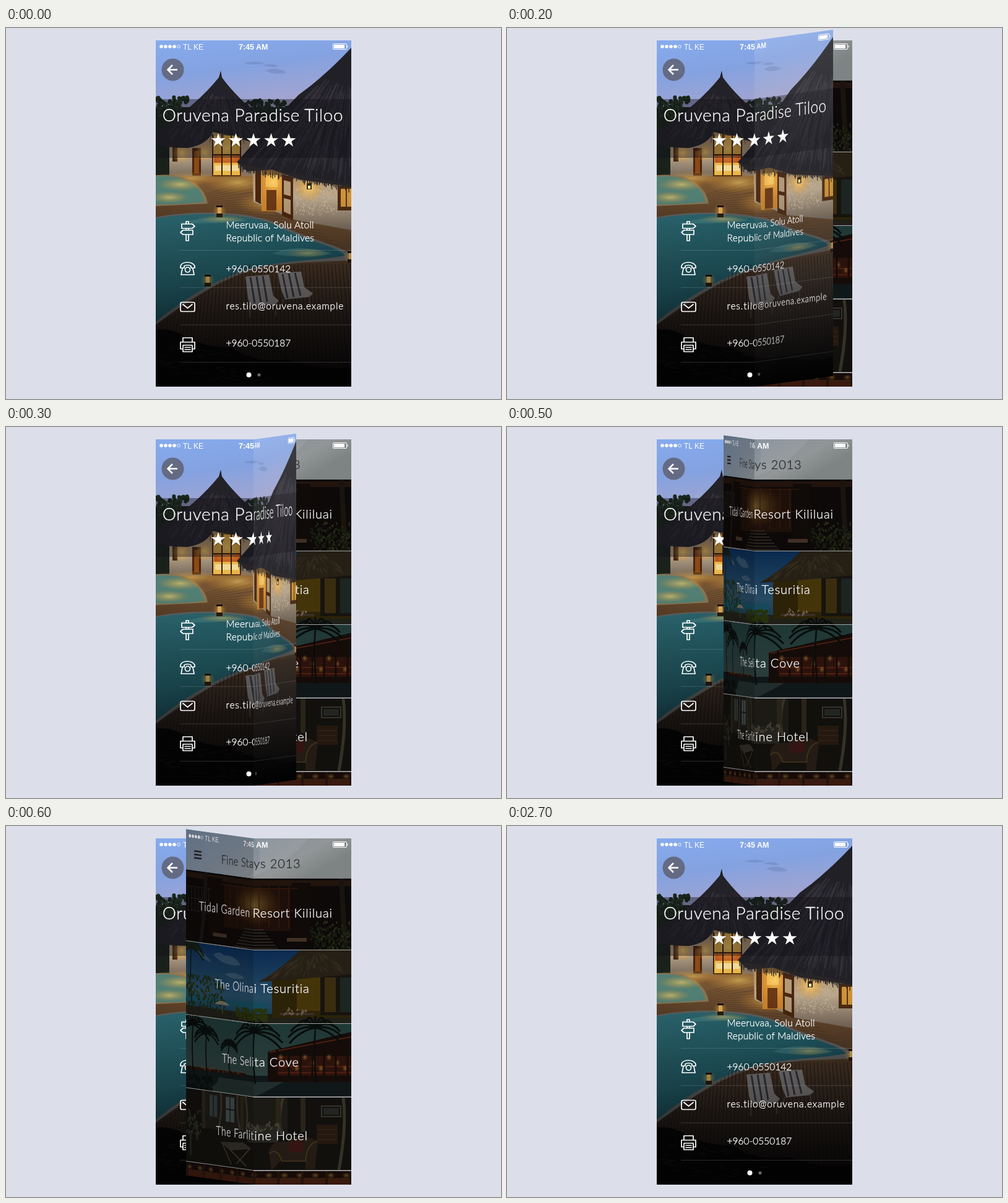
Write an HTML page that moves like this. It is 800 by 600 pixels and loops after 2.8 s.

```html
<!DOCTYPE html>
<html lang="en">
<head>
<meta charset="utf-8">
<title>Page flip</title>
<style>
html, body { margin: 0; width: 100%; height: 100%; overflow: hidden; background: #dcdfea; }
svg { display: block; width: 800px; height: 600px; }
text { font-family: Lato, "Open Sans", sans-serif; fill: #fff; }
.status { font: 12px "Liberation Sans", Arial, sans-serif; }
.bold { font-weight: bold; font-size: 12.5px; }
.title, .info, .item { font-weight: 300; stroke: #fff; stroke-width: .35px; }
.title { font-size: 28px; letter-spacing: .6px; text-anchor: middle; }
.info { font-size: 15.5px; }
.item { font-size: 20px; letter-spacing: .85px; text-anchor: middle; }
.heading { fill: #29292e; stroke: #29292e; }
.icon { fill: none; stroke: #fff; stroke-width: 1.7; stroke-linejoin: round; stroke-linecap: round; }
</style>
</head>
<body>
<svg viewBox="0 0 800 600">
  <defs>
    <clipPath id="left"><path d="M242 20H400V580H242Z"/></clipPath>
    <clipPath id="right"><path d="M400 20H558V580H400Z"/></clipPath>
    <linearGradient id="sky" x2=".35" y2="1"><stop stop-color="#86abee"/><stop offset=".45" stop-color="#84a2e0"/><stop offset="1" stop-color="#a9a5cc"/></linearGradient>
    <linearGradient id="deck" x2="0" y2="1"><stop stop-color="#7b5834"/><stop offset=".3" stop-color="#5a402a"/><stop offset=".6" stop-color="#352922"/><stop offset="1" stop-color="#100e0f"/></linearGradient>
    <linearGradient id="pool" x2=".7" y2="1"><stop stop-color="#2d6872"/><stop offset=".5" stop-color="#245f69"/><stop offset="1" stop-color="#113b4a"/></linearGradient>
    <linearGradient id="wall" x2="0" y2="1"><stop stop-color="#a98556"/><stop offset=".5" stop-color="#b9a78c"/><stop offset="1" stop-color="#77685a"/></linearGradient>
    <linearGradient id="dim" x2="0" y2="1"><stop stop-opacity="0"/><stop offset=".55" stop-opacity=".35"/><stop offset="1" stop-opacity=".75"/></linearGradient>
    <linearGradient id="sheen" x2="0" y2="1"><stop stop-color="#fff" stop-opacity=".13"/><stop offset=".45" stop-color="#999" stop-opacity=".05"/><stop offset="1" stop-opacity=".3"/></linearGradient>
    <radialGradient id="glow"><stop stop-color="#ffd56a" stop-opacity=".9"/><stop offset="1" stop-color="#e08a20" stop-opacity="0"/></radialGradient>
    <linearGradient id="head" y2=".35"><stop stop-color="#71839b"/><stop offset=".45" stop-color="#808c9a"/><stop offset=".8" stop-color="#929697"/><stop offset="1" stop-color="#7e8384"/></linearGradient>
    <linearGradient id="sea" x2="0" y2="1"><stop stop-color="#0b2a50"/><stop offset=".65" stop-color="#264a62"/><stop offset="1" stop-color="#123747"/></linearGradient>
    <linearGradient id="dusk" x2="0" y2="1"><stop stop-color="#1e3836"/><stop offset=".7" stop-color="#2b3d3a"/><stop offset="1" stop-color="#101b1d"/></linearGradient>
    <g id="detail"></g>
    <g id="list"></g>
  </defs>
  <use href="#detail" clip-path="url(#left)"/>
  <use href="#list" clip-path="url(#right)"/>
  <g id="flap">
    <use id="face"/>
    <rect id="shade" y="20" width="158" height="560"/>
  </g>
</svg>
<script>
const $ = id => document.getElementById(id);
let seed = 11;
const rnd = () => (seed = seed * 16807 % 2147483647) / 2147483647;
const repeat = (n, fn) => Array.from({ length: n }, (_, i) => fn(i)).join('');
const fill = (color, d, more = '') => `<path d="${d}" fill="${color}" ${more}/>`;
const line = (color, width, d, more = '') =>
  `<path d="${d}" fill="none" stroke="${color}" stroke-width="${width}" ${more}/>`;
const box = (color, x, y, w, h) => fill(color, `M${x} ${y}h${w}v${h}h${-w}z`);
const dot = (color, x, y, r) => `<circle cx="${x}" cy="${y}" r="${r}" fill="${color}"/>`;
const glow = (x, y, rx, ry = rx, opacity = 1) =>
  `<ellipse cx="${x}" cy="${y}" rx="${rx}" ry="${ry}" fill="url(#glow)" opacity="${opacity}"/>`;
const text = (cls, x, y, str, more = '') => `<text class="${cls}" x="${x}" y="${y}" ${more}>${str}</text>`;

const leaves = (color, n, x, y, w, h, size = 4) => line(color, size,
  repeat(n, () => `M${x + rnd() * w} ${y + rnd() * h}l${rnd() * 4 - 2} 2`), 'stroke-linecap="round"');

// Strands running from a ridge point down to an eave
const thatch = (color, n, ax, ay, x0, y0, x1, y1) => line(color, .8, repeat(n, () => {
  const f = rnd(), from = .25 + rnd() * .6, to = from + .15;
  const ex = x0 + (x1 - x0) * f, ey = y0 + (y1 - y0) * f;
  return `M${ax + (ex - ax) * from} ${ay + (ey - ay) * from}L${ax + (ex - ax) * to} ${ay + (ey - ay) * to}`;
}));

const palm = (color, x, y, r, base) => line(color, 2.5, `M${x} ${y}Q${x - 4} ${(y + base) / 2} ${x + 2} ${base}`) +
  line(color, 3, repeat(11, i => {
    const a = Math.PI * (.9 + i * .12), dx = Math.cos(a) * r, dy = Math.sin(a) * r * .6;
    return `M${x} ${y}q${dx * .6} ${dy - 3} ${dx} ${dy + r * .4}`;
  }));

const lantern = (x, y) => glow(x, y, 12, 12, .6) + box('#1b120c', x - 5, y - 9, 10, 3) +
  box('#e0ad55', x - 3, y - 6, 6, 10) + box('#2a1a0d', x - 5, y + 4, 10, 6);

const star = cx => fill('#fff', 'M' + Array.from({ length: 10 }, (_, i) => {
  const r = i % 2 ? 4.6 : 12, a = i * Math.PI / 5;
  return [cx + r * Math.sin(a), 182 - r * Math.cos(a)].map(v => v.toFixed(1));
}).join('L') + 'Z');

const status = repeat(4, i => dot('#fff', 251 + i * 7, 30, 2.8)) +
  '<circle cx="279" cy="30" r="2.4" fill="none" stroke="#fff" stroke-width=".8"/>' +
  text('status', 286, 34.5, 'TL KE') + text('status bold', 376, 34.5, '7:45 AM') +
  line('#fff', 1, 'M530 25.5h19q1.5 0 1.5 1.5v6q0 1.5-1.5 1.5h-19q-1.5 0-1.5-1.5v-6q0-1.5 1.5-1.5zM552 28.5v3') +
  box('#fff', 530, 27, 17, 6);

const scene =
  box('url(#sky)', 242, 20, 316, 120) +
  fill('#6f84b8', 'M384 57q18-5 34 0q-18 4-34 0zM419 69q17-8 35 3q-20 5-35-3zM415 60q15-4 26 2q-14 3-26-2z', 'opacity=".5"') +
  box('#1a211b', 242, 128, 316, 120) +
  leaves('#18271a', 140, 242, 112, 58, 90, 6) + leaves('#263a22', 45, 244, 115, 44, 30, 3) +
  leaves('#1b2a20', 60, 385, 116, 80, 18, 5) +
  palm('#172419', 405, 121, 10, 135) +
  // Left hut
  fill('url(#wall)', 'M264 185L335 168L400 185V240H264Z') +
  box('#3d2412', 269, 193, 8, 23) + box('#4a230d', 301, 194, 14, 45) + box('#8a4a16', 304, 199, 8, 36) +
  glow(284, 202, 17) + glow(321, 201, 16) +
  box('#e9b94b', 334, 174, 45, 66) + box('#b9531f', 336, 206, 42, 12) + box('#f0d898', 338, 222, 38, 9) +
  glow(357, 195, 28) +
  line('#3b1d0c', 2, 'M334 172V240M349 172V240M364 172V240M379 172V240M334 205H379M334 239H379') +
  fill('#232228', 'M347 69L349 80Q380 123 455 178L440 200Q388 177 336 166Q325 189 294 194Q264 194 242 188V168Q305 128 344 80Z') +
  thatch('#3c393f', 170, 347, 78, 242, 188, 440, 195) +
  // Terrace
  box('url(#deck)', 242, 240, 316, 340) +
  line('#3a2818', .7, repeat(26, i => `M242 ${285 + i * 1.2}Q330 ${270 + i * 2} ${410 + i * 7} ${243 + i * 6}`), 'opacity=".55"') +
  glow(300, 243, 62, 11, .55) + glow(375, 250, 55, 18, .6) + glow(425, 283, 55, 20, .65) +
  // Right hut
  fill('url(#wall)', 'M398 220H558V327L465 310L400 281Z') +
  leaves('#c9baa2', 150, 468, 254, 66, 48, 1) +
  box('#cd862d', 413, 230, 36, 66) + box('#efbd5b', 420, 237, 19, 20) + glow(433, 250, 30, 38, .8) +
  box('#6b3916', 421, 262, 16, 33) +
  fill('#4a260f', 'M403 230h9v55l-9-5zM446 237l18 4v70l-18-8z') +
  fill('#b39a77', 'M449 246l11 3v23l-11-3zM449 275l11 3v24l-11-5z') +
  glow(490, 258, 24) + box('#34251a', 486, 251, 8, 10) + box('#fff0b4', 488, 255, 4, 5) +
  box('#4c2a10', 536, 255, 22, 40) + box('#cf9339', 541, 260, 17, 29) + line('#55310f', 2, 'M550 258V291') +
  fill('#212026', 'M558 32Q515 78 473 108Q424 158 373 217L390 232L430 229L475 245L558 257Z') +
  thatch('#3b3840', 260, 558, 35, 378, 222, 558, 255) +
  line('#2c2728', 1.3, repeat(90, i => `M${376 + i * 2} ${219 + i * .37}l${rnd() * 2 - 1} ${7 + rnd() * 8}`)) +
  // Pools
  fill('#857555', 'M242 238Q283 235 306 251Q324 266 326 284L242 288Z') +
  fill('#527f74', 'M242 240Q282 238 302 253Q318 265 320 281Q280 286 242 285Z') +
  glow(282, 253, 38, 11, .65) + glow(264, 274, 32, 10, .65) +
  fill('#5f615f', 'M242 306C300 294 400 295 445 319C500 346 547 353 558 368V376C505 379 440 377 382 397C330 416 278 453 242 480Z') +
  fill('url(#pool)', 'M242 308C300 297 400 298 442 322C492 347 538 354 548 368C505 377 435 375 378 394C325 413 276 448 242 475Z') +
  fill('#5a9a98', 'M278 316Q330 301 390 311Q346 317 278 316ZM430 365Q470 347 527 365Q480 374 430 365Z', 'opacity=".35"') +
  glow(488, 364, 36, 8, .5) + glow(350, 309, 42, 7, .5) +
  line('#0b0b0d', 1, repeat(54, i => `M${250 + i * 6} ${Math.max(382, 478 - i * 4.3)}L${228 + i * 6.8} 580`), 'opacity=".6"') +
  // Loungers
  fill('#807c7b', 'M387 402L425 399L432 433L441 441L436 447L395 449L391 437Z M439 396L477 394L482 419L496 429L491 435L451 439L445 424Z') +
  line('#343742', 3, 'M395 403l7 42M405 402l7 42M415 401l7 42M447 398l8 39M457 397l8 38M467 396l9 37') +
  line('#4c4341', 2, 'M394 448v21M436 446v19M449 438l-3 13M491 433v13') +
  lantern(326, 408) + lantern(345, 296) + lantern(557, 370) +
  fill('#070709', 'M242 488Q270 484 294 502Q330 518 363 516Q405 543 455 536Q510 555 558 548V580H242Z') +
  line('#1c1c20', 1, repeat(55, () => `M${242 + rnd() * 180} ${510 + rnd() * 60}l12 ${rnd() * 7 - 3}`)) +
  box('url(#dim)', 242, 270, 316, 310);

$('detail').innerHTML = scene +
  box('rgba(18,16,22,.42)', 242, 115, 316, 95) + status +
  dot('rgba(91,91,106,.78)', 269.5, 67.5, 18) +
  line('#fff', 2.5, 'M277 67.5H262M269 60L261.5 67.5L269 75') +
  text('title', 399, 151, 'Oruvena Paradise Tiloo') +
  repeat(5, i => star(343 + i * 28.5)) +
  text('info', 355.5, 324, 'Meeruvaa, Solu Atoll', 'letter-spacing=".25"') +
  text('info', 355.5, 344.5, 'Republic of Maldives', 'letter-spacing=".25"') +
  text('info', 355.5, 395, '+960-0550142') +
  text('info', 355.5, 455, 'res.tilo@oruvena.example', 'letter-spacing=".85"') +
  text('info', 355.5, 515, '+960-0550187') +
  repeat(4, i => box('rgba(255,255,255,.15)', 281, 359 + i * 60.3, 277, 1)) +
  `<g class="icon">
    <path d="M291 317v-4h4v4M284 317h17l4 3.5l-4 3.5h-17zM291 324v3M295 324v3M302 327h-16l-4 3.5l4 3.5h16zM291 334v10h4v-10"/>
    <path d="M282 388v-3q2-6 11-6t12 6v3h-6v-3q-6-3-11 0v3zM285 389l-2 10h21l-2-10"/><circle cx="293.5" cy="391" r="4"/>
    <rect x="282" y="443.5" width="23" height="15" rx="2.5"/><path d="M286 447l7.5 6l7.5-6"/>
    <path d="M286 508v-7h15v7M286 519h-4v-11h23v11h-4M286 513h15v10.5h-15zM289 516.5h9M289 520h9"/>
  </g>` +
  dot('#fff', 392.5, 561, 4) + dot('#67676b', 409, 561, 2.6);

const lodge =
  box('#130d0b', 242, 85, 316, 115) + box('#301c12', 242, 88, 316, 9) +
  box('#29150d', 330, 100, 130, 70) + glow(399, 128, 46, 34, .5) +
  box('#180f0c', 292, 92, 36, 94) + box('#170e0c', 462, 92, 30, 94) +
  line('#4a2411', 2, repeat(8, i => `M${345 + i * 16} 98V165`) + 'M325 101H472M325 137H472', 'opacity=".7"') +
  line('#343330', 1, repeat(7, i => `M${247 + i * 8} 111V150`) + 'M245 111H300M245 130H300M245 150H300') +
  line('#3b332d', 2, repeat(7, i => `M${380 - i * 4} ${168 + i * 5}H${416 + i * 4}`)) +
  box('#5b4433', 305, 181, 32, 6) + box('#5b4433', 454, 181, 32, 6) +
  line('#241c17', 8, 'M276 200Q288 140 288 85M542 85L548 200') +
  leaves('#202817', 90, 492, 163, 66, 37, 3) + leaves('#39401f', 50, 502, 153, 54, 45, 2) +
  box('rgba(0,0,0,.3)', 242, 85, 316, 115);

const beach =
  box('url(#sea)', 242, 201, 316, 118) +
  fill('#60727d', 'M306 217q13-9 25-1q24-4 39 12q-38 7-64-11zM333 246q24-9 47 2q-26 7-47-2zM268 211q20 6 34 19q-28-4-34-19z', 'opacity=".4"') +
  box('#164a5b', 242, 286, 180, 10) + box('#201f18', 242, 304, 316, 15) +
  palm('#121d13', 254, 211, 30, 303) + leaves('#1c2914', 150, 242, 252, 90, 55, 3) + leaves('#36401c', 45, 247, 259, 76, 30, 1.5) +
  fill('#777260', 'M309 296q16-12 35 0z') + line('#55533e', 1, 'M327 292v20') +
  box('#2b2207', 430, 240, 128, 70) + box('#43340a', 470, 240, 88, 59) +
  box('#17130e', 508, 238, 50, 68) + box('#3a2d0f', 515, 245, 18, 56) + box('#1d2522', 540, 245, 18, 56) +
  fill('#251f15', 'M408 252Q450 228 474 201H558V240L480 247Z') +
  thatch('#3c3220', 110, 500, 195, 408, 252, 558, 238) +
  leaves('#27320c', 80, 358, 296, 62, 18, 4) +
  box('#3b2e25', 442, 302, 56, 4) + leaves('#6d5b4e', 18, 449, 292, 40, 12, 2);

const lagoon =
  box('url(#dusk)', 242, 320, 316, 118) + box('#101718', 242, 404, 316, 34) +
  fill('#150c0a', 'M423 365L558 333V414H423Z') + box('#2c120c', 436, 372, 122, 32) +
  line('#5b2411', 1.5, 'M426 366L558 341M430 389H558M438 399H558') +
  repeat(9, i => glow(444 + i * 13, 374 + i % 3 * 9, 5, 6, .4)) +
  line('#120c09', 3, repeat(7, i => `M${438 + i * 19} 361V409`)) +
  box('#20110c', 242, 402, 140, 5) + leaves('#6b361c', 20, 245, 399, 126, 5, 1.5) +
  fill('#31413d', 'M317 414H448Q424 428 402 438H284Q320 427 317 414Z', 'opacity=".55"') +
  palm('#070c0b', 258, 334, 40, 417) + palm('#090f0d', 290, 345, 29, 416) + palm('#0b100e', 343, 359, 20, 405) +
  palm('#080d0b', 401, 334, 46, 417) + palm('#080c0a', 500, 326, 44, 415) +
  leaves('#090e0c', 60, 242, 416, 60, 22, 4);

const salon =
  box('#12100d', 242, 439, 316, 118) + box('#1c1a15', 285, 439, 170, 60) +
  box('#3f4a4a', 335, 444, 20, 40) + box('#303938', 297, 444, 18, 35) +
  line('#171510', 2, 'M345 444V484M335 464H355M306 444V479') +
  line('#37322a', 4, 'M323 439Q327 465 319 494M363 439Q359 470 369 495M381 439Q389 470 382 499M448 439Q438 475 446 500') +
  line('#292418', 8, 'M283 439V500M373 439V496M440 439V492M480 439V495') +
  line('#37322a', 2, 'M510 453h31v17h-31z') + box('#222522', 513, 456, 25, 11) +
  box('#24180f', 502, 483, 34, 31) + line('#3a281b', 1, 'M504 491h30M504 499h30M504 507h30') +
  box('#24231e', 386, 485, 54, 27) + leaves('#403c31', 28, 386, 479, 55, 14, 3) +
  fill('#241c14', 'M425 527Q428 508 454 511Q476 494 504 510L499 555H484V542H443L429 557Z') +
  fill('#351414', 'M458 511L479 508L482 526L456 528Z') +
  line('#46351f', 1.5, 'M425 530Q438 519 446 542H484Q486 514 503 510') +
  fill('#312e25', 'M322 518L376 514L396 523L345 530Z') + line('#403727', 2, 'M326 519L348 552M391 523L360 550M346 529L383 552') +
  line('#343127', 5, 'M545 439Q551 485 538 556') + line('#202120', 5, 'M242 508H253V546M268 494V521') +
  leaves('#292a1f', 42, 247, 471, 29, 39, 3);

const bar = box('#160b08', 242, 558, 316, 22) + box('#3a1a0e', 242, 571, 316, 9) +
  line('#52301a', 1, 'M242 570H558') + repeat(13, i => glow(250 + i * 25, 565, 7, 5, .35)) +
  line('#21130d', 4, repeat(9, i => `M${245 + i * 39} 558V580`));

const items = [[148, 'Tidal Garden Resort Kililuai'], [270, 'The Olinai Tesuritia'],
  [389, 'The Selita Cove'], [507.5, 'The Farlitine Hotel']];

$('list').innerHTML = lodge + beach + lagoon + salon + bar +
  box('url(#head)', 242, 20, 316, 65) +
  fill('#bbbcba', 'M402 20H488Q457 62 389 85Q424 53 402 20Z', 'opacity=".18"') +
  [200, 319, 437.5, 556.5].map(y => box('#a4a4a4', 242, y, 316, 1)).join('') + status +
  line('#28272c', 2.6, 'M261 53.5H278.5M261 59H278.5M261 64.5H278.5') +
  text('item heading', 400.5, 68, 'Fine Stays 2013') +
  items.map(([y, name]) => text('item', 400, y, name)).join('');

// Signed flap width at each step: right page first, then left page
const widths = [158, 140, 127, 69, 10, -50, -109, -158];
const slope = .137;
let shown = -1;

function draw(now) {
  const t = now % 2800;
  const step = t >= 2700 ? 0 : Math.min(7, Math.floor(t / 100));
  if (step !== shown) {
    shown = step;
    const scale = Math.abs(widths[step]) / 158, front = widths[step] > 0, flat = scale === 1;
    const skew = flat ? 0 : (front ? -slope : slope) * scale;
    $('face').setAttribute('href', front ? '#detail' : '#list');
    $('face').setAttribute('clip-path', `url(#${front ? 'right' : 'left'})`);
    $('shade').setAttribute('x', front ? 400 : 242);
    $('shade').setAttribute('fill', front ? 'url(#sheen)' : 'rgba(0,0,0,.15)');
    $('shade').setAttribute('opacity', flat ? 0 : 1);
    $('flap').setAttribute('transform', `matrix(${scale} ${skew} 0 1 ${400 * (1 - scale)} ${-400 * skew})`);
  }
  requestAnimationFrame(draw);
}
draw(performance.now());
</script>
</body>
</html>
```
